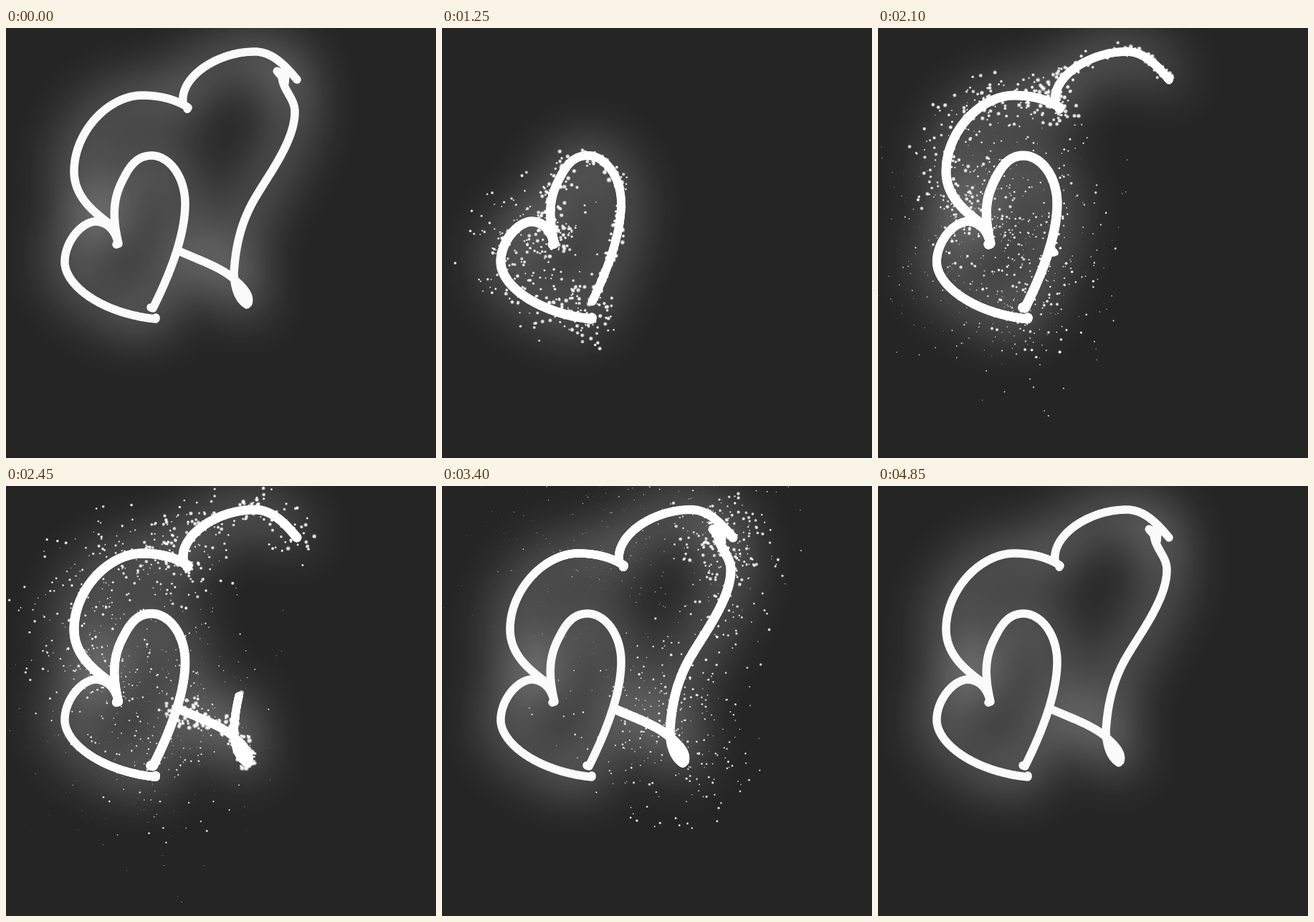
An HTML page with a canvas that plays this animation: 600 by 600 pixels, repeating every 5.15 s.

```html
<!DOCTYPE html>
<html>
<head>
<meta charset="utf-8">
<style>
html, body { margin: 0; width: 100%; height: 100%; overflow: hidden; background: #252525; }
canvas { display: block; }
</style>
</head>
<body>
<canvas id="stage" width="600" height="600"></canvas>
<script>
const ctx = document.getElementById('stage').getContext('2d');
const LOOP = 5150, STEP = 50, LIFE = 2000, SWELL = 1800, END = 2850;

// Pen strokes: start time, end time, path
const strokes = [
  [400, 790, 'M156 299C152 281 140 270 124 270C103 272 81 301 82 328C84 362 138 399 209 406L209 404'],
  [850, 1300, 'M154 302L157 301C146 255 152 232 165 208C176 186 188 178 203 178C228 178 250 208 250 245C250 290 228 345 205 391L202 390'],
  [1330, 1790, 'M152 279C130 262 95 240 95 200C95 145 143 94 190 94C213 94 236 99 254 111L253 113'],
  [1800, 2000, 'M247 104C243 68 295 33 347 33C372 33 390 53 406 72'],
  [2080, 2330, 'M243 312C275 326 305 336 322 354C333 364 341 374 338 384'],
  [2330, 2690, 'M336 386C326 380 319 366 318 342C320 310 326 275 346 240C366 205 403 158 403 117C403 98 387 88 385 68L378 60L390 66L389 77']
];

let seed = 7;
function rand() {
  seed = (seed * 16807) % 2147483647;
  return seed / 2147483647;
}

const ease = u => u * u * (3 - 2 * u);

const trail = [], sparks = [];
function addSpark(p, born) {
  const angle = rand() * Math.PI * 2, speed = 0.12 * rand();
  sparks.push({
    x: p.x + (rand() - 0.5) * 10, y: p.y + (rand() - 0.5) * 10, born,
    vx: Math.cos(angle) * speed, vy: Math.sin(angle) * speed,
    size: 1.5 + rand() * 2.5
  });
}
function addPoint(p, born, first) {
  trail.push({ x: p.x, y: p.y, born, first });
  addSpark(p, born);
  if (rand() < 0.5) addSpark(p, born);
}

let last;
for (const [start, end, d] of strokes) {
  const path = document.createElementNS('http://www.w3.org/2000/svg', 'path');
  path.setAttribute('d', d);
  const length = path.getTotalLength();
  for (let t = start; t <= end; t += 2) {
    last = path.getPointAtLength(length * ease((t - start) / (end - start)));
    addPoint(last, t, t === start);
  }
}
// The pen rests at the end of the last stroke
for (let t = strokes[5][1] + 2; t <= END; t += 2) addPoint(last, t, false);

function dot(x, y, r, color) {
  ctx.fillStyle = color;
  ctx.beginPath();
  ctx.arc(x, y, r, 0, Math.PI * 2);
  ctx.fill();
}

function tracePath(points, dx) {
  ctx.beginPath();
  for (const p of points) {
    if (p.first) ctx.moveTo(p.x + dx, p.y);
    ctx.lineTo(p.x + dx, p.y);
  }
}

function drawLine(points) {
  ctx.lineCap = ctx.lineJoin = 'round';
  ctx.strokeStyle = '#fafafa';
  // Only the shadow of this stroke lands on the stage
  ctx.save();
  ctx.shadowColor = '#fff';
  ctx.shadowBlur = 74;
  ctx.shadowOffsetX = 1000;
  ctx.lineWidth = 14;
  tracePath(points, -1000);
  ctx.stroke();
  ctx.restore();
  ctx.lineWidth = 11.5;
  tracePath(points, 0);
  ctx.stroke();
}

function draw(t) {
  ctx.fillStyle = '#252525';
  ctx.fillRect(0, 0, 600, 600);
  const points = trail.filter(p => p.born <= t);
  if (!points.length) return;
  drawLine(points);
  for (const p of points) {
    const age = t - p.born;
    if (age < SWELL) dot(p.x, p.y, 5.75 + 0.9 * Math.sin(Math.PI * age / SWELL), '#fff');
  }
  for (const s of sparks) {
    const age = t - s.born;
    if (age < 0 || age >= LIFE) continue;
    const travel = age * age / (age + 150);
    const x = s.x + s.vx * travel, y = s.y + s.vy * travel;
    const r = s.size * (1 - age / LIFE);
    dot(x, y, r, 'rgba(255,255,255,0.5)');
    dot(x, y, r * 0.6, '#fff');
  }
}

function frame(now) {
  const t = Math.floor((now % LOOP) / STEP) * STEP;
  draw(t < STEP ? LOOP : t);
  requestAnimationFrame(frame);
}
draw(LOOP);
requestAnimationFrame(frame);
</script>
</body>
</html>
```
